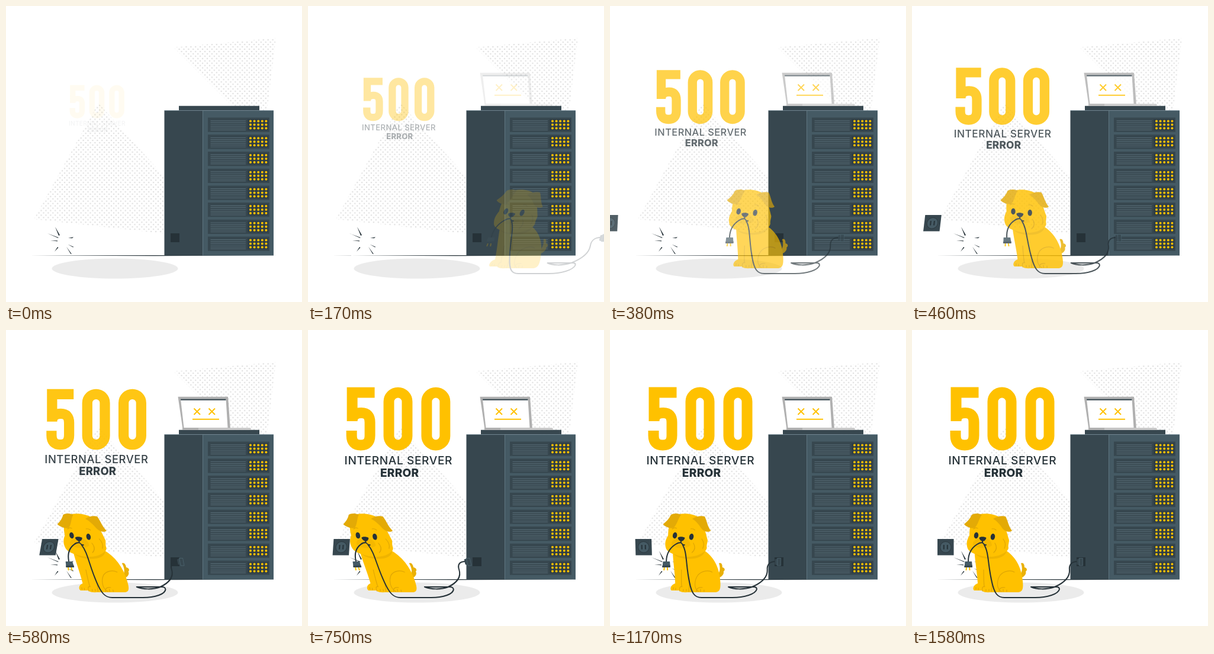
Animation, 500 px wide and 500 px high, one loop 1620 ms. Source, as an HTML page:

```html
<!DOCTYPE html>
<html lang="en">
<head>
<meta charset="utf-8">
<title>500 Internal Server Error</title>
<style>
  html, body { margin: 0; width: 100%; height: 100%; overflow: hidden; background: #fff; }
  svg { display: block; width: 100%; height: 100%; }
  text { font: 500 19.2px Inter, sans-serif; letter-spacing: .58px; text-anchor: middle; fill: #263238; }
  .bold { font-weight: 800; letter-spacing: .2px; }
  .line { fill: none; stroke: #263238; stroke-width: 2; stroke-linecap: round; stroke-linejoin: round; }
  .fold { fill: none; stroke: #dfa604; stroke-width: 1.2; stroke-linecap: round; }
</style>
</head>
<body>
<svg viewBox="0 0 500 500">
  <defs>
    <pattern id="dots" x="140.5" y="300.1" width="7.9" height="7.9" patternUnits="userSpaceOnUse">
      <g fill="#e0e0e0"><circle cx="2" cy="2" r="1.3"/><circle cx="5.95" cy="5.95" r="1.3"/></g>
    </pattern>
  </defs>

  <g fill="url(#dots)">
    <path d="M283 70L456 54L438 200H413Z"/>
    <path d="M156 164L47 360L290 387V313Z"/>
  </g>
  <ellipse cx="184" cy="443.5" rx="106.5" ry="17" fill="#ebebeb"/>
  <path d="M40 421.5L250 421L460 421.5L250 422.2Z" fill="#263238"/>

  <g id="outlet">
    <path d="M43 353H70.500V380.500H43Z" fill="#37474f"/>
    <circle cx="56.800" cy="366.800" r="9.300" fill="#455a64" stroke="#263238" stroke-width=".8"/>
    <path d="M53.800 363V370.500M59.800 363V370.500" stroke="#263238" stroke-width="2"/>
  </g>

  <path fill="#263238" d="M83 373L91 387L89 388ZM70 384L88.500 391L88 392ZM75 396L87 396.300V397.500ZM82 415L87 407L88.500 408ZM102 406.500L111 419L109 418.500ZM104.500 402.500L114.500 407L113 407.500ZM105 392L114 390.300L112 392.300Z"/>

  <g id="rack">
    <path d="M267.500 176.500H333V421.500H267.500Z" fill="#37474f"/>
    <path d="M332.500 176.500H452V421.500H332.500Z" fill="#455a64"/>
    <path d="M292 168.700H428V176.500H292Z" fill="#37474f"/>
    <path d="M267.500 176.600H452M332.500 176.500V421.500" stroke="#78909c" stroke-width=".6"/>
    <path d="M278 384H293V399H278Z" fill="#263238"/>
  </g>

  <g id="laptop">
    <path d="M290.500 112.700H375L379 167H298.500Z" fill="#b0b0b0"/>
    <path d="M295 116.500H371.500L374.500 165H300.500Z" fill="#fff"/>
    <path d="M295 116.500H371.500V118.700H295.200Z" fill="#37474f"/>
    <path d="M298 165.200H412Q414 165.500 414 168.700H298Z" fill="#c7c7c7"/>
    <path d="M298 165.200H325V168.700H298Z" fill="#b0b0b0"/>
    <path d="M317.500 132.500L328 143M328 132.500L317.500 143M342.500 132.500L353 143M353 132.500L342.500 143M315 150.800H360" fill="none" stroke="#ffc100" stroke-width="2"/>
  </g>

  <g id="title">
    <g fill="none" stroke="#ffc100" stroke-width="18" role="img" aria-label="500">
      <path d="M112.500 105.500H74.500V154M74.500 153C75 143 82 140 90 140Q104.500 140 104.500 156V178Q104.500 194.500 89 194.500T73.500 178V170"/>
      <rect x="136.500" y="105.500" width="31" height="89" rx="15.500"/>
      <rect x="200.500" y="105.500" width="31" height="89" rx="15.500"/>
    </g>
    <text x="152.800" y="227">INTERNAL SERVER</text>
    <text x="154.700" y="248.300" class="bold">ERROR</text>
  </g>

  <g id="dog">
    <g fill="#ffc100">
      <path d="M179 418C187 410 187 402 184 394C188 392 190 396 190 401C195 402 195 406 192 408C194 412 189 418 181 420Z" fill="#e9b006"/>
      <path d="M105 366C106 390 110 408 111 428C103 431 102 438 105 440H119L119 441C122 444 130 443 136 443H180C188 442 188 434 187 424C185 400 174 382 158 372Z"/>
      <path d="M105 314C118 308 138 309 149 317C157 327 160 342 164 355C164 360 162 362 163 368C161 377 150 383 135 382C117 383 98 378 94 369C91 360 93 354 97 347C97 334 99 323 105 314Z"/>
    </g>
    <path d="M107 378C122 386 148 385 160 373C159 380 151 385 141 386C128 388 113 385 107 378Z" fill="#efb400"/>
    <g fill="#e3aa06">
      <path d="M118 312C111 309 105 310 101 312C98 319 93 324 88 328C92 333 101 336 106 334C111 330 113 319 118 312Z"/>
      <path d="M137 319C143 315 152 313 158 315C162 322 163 332 169 339C164 343 156 340 152 334C148 328 143 322 137 319Z"/>
    </g>
    <path class="fold" d="M121 405Q121 422 122 434M119 441Q117 433 123 433M134 417Q136 429 134 442M151 442C142 437 143 423 149 414C155 407 166 405 173 409M147 442Q147 434 157 435M108 438V435M112 439V436M125 441V438M130 441V438M154 442V438M160 442V439M140 360Q146 369 138 376M154 353Q160 361 156 369M104 336Q107 333 111 335M135 336Q139 335 142 338"/>
    <path d="M103 359C106 353 114 350 120 352C130 351 135 357 135 364C127 370 111 370 103 363Z" fill="#f4b800"/>
    <g fill="#263238">
      <ellipse cx="108.500" cy="347" rx="3.700" ry="5.300" transform="rotate(8 108.500 347)"/>
      <ellipse cx="136.500" cy="349.300" rx="3.700" ry="5.300" transform="rotate(8 136.500 349.300)"/>
      <path d="M113.500 351C115 348.500 123 349 125.500 351C125 354 122 357 119 357C116 356 114 354 113.500 351Z"/>
    </g>
    <path class="line" d="M119 356V359Q114 359 110 362C99 369 95 379 95 391M119 359Q123 364 125 363"/>
    <path class="line" d="M122 363C130 376 128 397 135 426C139 444 144 452 156 452H208C229 452 247 446 249 438Q249 434 244 434H201C210 438 227 439 241 434C257 427 267 417 266 405C265 396 270 391 280 391"/>
    <path d="M92 400L91.500 406M97 400L97.500 406" stroke="#ffc100" stroke-width="2"/>
    <path d="M89.500 391H101L102 400L88.500 401Z" fill="#455a64"/>
    <path d="M88.500 398L102 397.500V401H88.500Z" fill="#37474f"/>
    <path d="M278.500 387.500L283 386V397.500L278.500 396Z" fill="#37474f"/>
    <path d="M282.500 385.500H288.500V398H282.500Z" fill="#37474f" stroke="#546e7a" stroke-width=".6"/>
  </g>
</svg>

<script>
const LOOP = 1620;
const $ = id => document.getElementById(id);
const clamp = v => Math.min(1, Math.max(0, v));

// Rack units with vents and status lights
let units = '';
for (let i = 0; i < 8; i++) {
  const y = 188.6 + i * 28.7;
  let vents = '', lights = '';
  for (let j = 0; j < 6; j++) vents += `M345.500 ${y + 5.2 + j * 3.1}h59.500`;
  for (let j = 0; j < 15; j++)
    lights += `<circle cx="${413 + j % 5 * 6.6}" cy="${y + 6 + Math.floor(j / 5) * 6}" r="2"/>`;
  units += `<path d="M341 ${y}h104v24.200h-104z" fill="#37474f"/>
    <path d="M408 ${y + 2.5}h35v19h-35z" fill="#2f3e46"/>
    <path d="${vents}" stroke="#536771" stroke-width="1.200"/>
    <g fill="#ffc100">${lights}</g>`;
}
$('rack').insertAdjacentHTML('beforeend', units);

// Smooth curve through [time, value] keys
function curve(keys) {
  const slope = i => {
    const a = keys[Math.max(0, i - 1)], b = keys[Math.min(keys.length - 1, i + 1)];
    return (b[1] - a[1]) / (b[0] - a[0]);
  };
  return t => {
    if (t >= keys[keys.length - 1][0]) return keys[keys.length - 1][1];
    const i = keys.findIndex(k => k[0] > t) - 1;
    const [t0, a] = keys[i], [t1, b] = keys[i + 1];
    const d = t1 - t0, u = (t - t0) / d, v = 1 - u;
    return v * v * (1 + 2 * u) * a + u * u * (3 - 2 * u) * b
      + d * u * v * (v * slope(i) - u * slope(i + 1));
  };
}

const dogX = curve([[0, 285], [170, 204], [380, 105.5], [580, 20], [750, -4], [900, -5], [1030, -3], [1170, -1], [1580, 0]]);
const dogSkew = curve([[0, -28], [170, -14.4], [380, -2.5], [580, 11.2], [750, 13], [900, 5], [1030, -1], [1170, -1.4], [1580, 0]]);
const outletX = curve([[0, -250], [170, -160], [380, -58], [580, 15.5], [750, -.5], [900, -2], [1080, 0]]);
const outletSkew = curve([[0, 20], [170, 9], [380, -3], [580, -10], [750, -4], [950, 1.5], [1580, 0]]);

function place(el, x, skew, baseY) {
  const k = Math.tan(skew * Math.PI / 180);
  el.setAttribute('transform', `matrix(1 0 ${k} 1 ${x - k * baseY} 0)`);
}

function draw(t) {
  const zoom = Math.sin(clamp((t + 25) / 820) * Math.PI / 2);
  const fade = clamp((t - 70) / 480);
  $('title').setAttribute('opacity', zoom);
  $('title').setAttribute('transform', `translate(155 174.500) scale(${.5 + zoom / 2}) translate(-155 -174.500)`);
  $('laptop').setAttribute('opacity', fade);
  $('dog').setAttribute('opacity', fade);
  $('outlet').setAttribute('opacity', clamp(t / 440));
  place($('dog'), dogX(t), dogSkew(t), 434);
  place($('outlet'), outletX(t), outletSkew(t), 367);
}

const start = performance.now();
function tick() {
  draw((performance.now() - start) % LOOP);
  requestAnimationFrame(tick);
}
tick();
</script>
</body>
</html>
```
